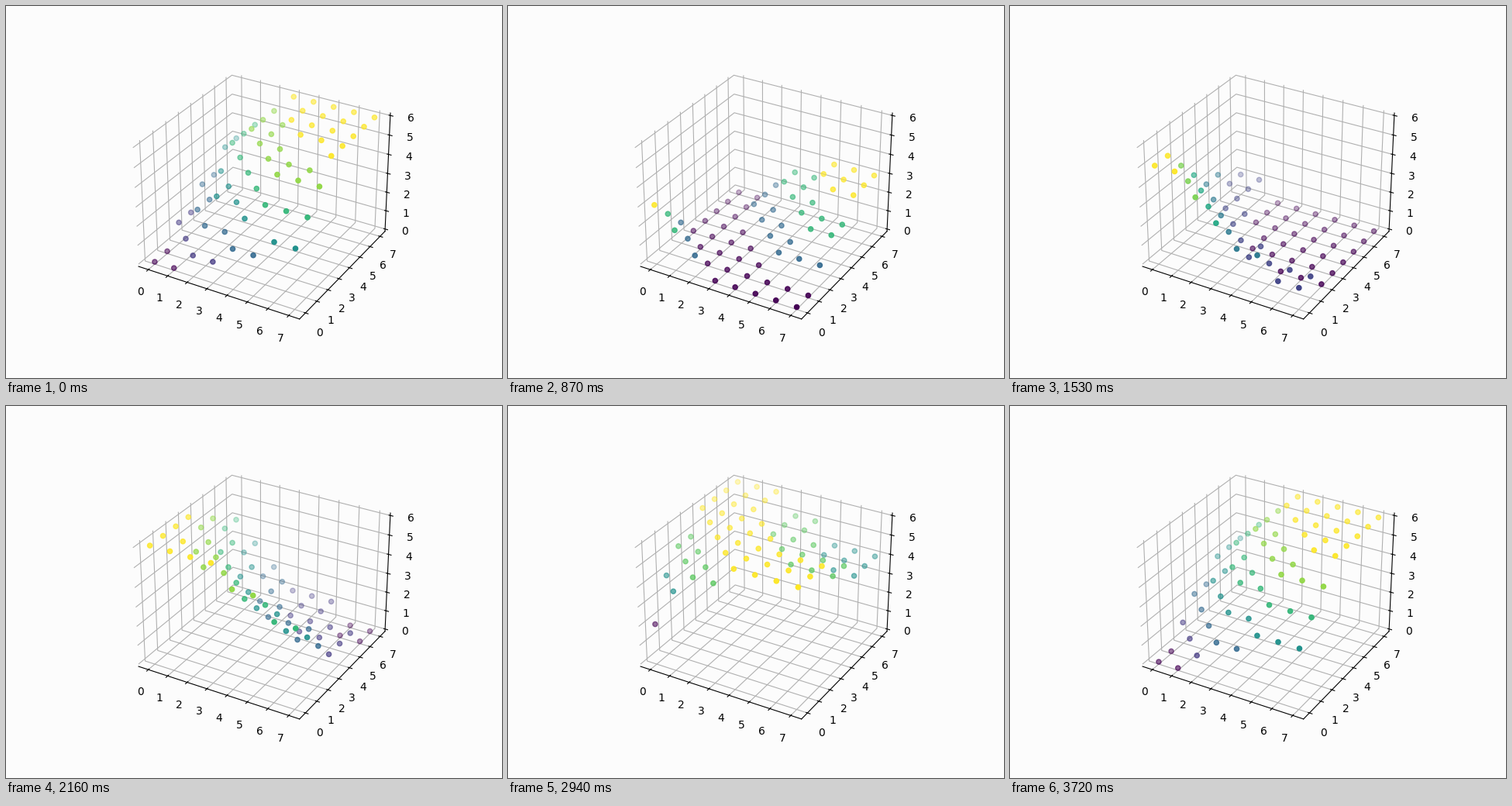
A matplotlib script for the animation above (3750 ms loop, 640 px wide and 480 px high).

```python
import numpy as np
import matplotlib.pyplot as plt
from matplotlib.animation import FuncAnimation

SIZE = 8          # points per side
FRAMES = 125
INTERVAL = 30     # ms
SPEED = 0.05      # phase per frame
AMP = 3           # half the wave's height
CENTRE = 7.5      # the rings shrink towards this corner
BACK = "#fcfcfc"


def padded(low, high, margin=0.0):
    """Limits with a data margin plus the usual small 3D view margin."""
    pad = (high - low) * margin
    low, high = low - pad, high + pad
    view = (high - low) / 48
    return low - view, high + view


fig = plt.figure(figsize=(6.4, 4.8), dpi=100, facecolor=BACK)
ax = fig.add_subplot(projection="3d", facecolor=BACK)
ax.set_xlim(*padded(0, SIZE - 1, 0.05))
ax.set_ylim(*padded(0, SIZE - 1, 0.05))
ax.set_zlim(*padded(0, 2 * AMP))
ax.set_xticks(range(SIZE))
ax.set_yticks(range(SIZE))
ax.set_zticks(range(2 * AMP + 1))
for axis in (ax.xaxis, ax.yaxis, ax.zaxis):
    axis.set_pane_color(BACK)

x, y = (g.ravel() for g in np.meshgrid(range(SIZE), range(SIZE)))
phase = np.pi * ((x - CENTRE) ** 2 + (y - CENTRE) ** 2) / (2 * CENTRE ** 2)
dots = None


def update(i):
    """Redraw the dots; colours span the heights present in this frame."""
    global dots
    if dots is not None:
        dots.remove()
    z = np.rint(AMP + AMP * np.cos(phase + SPEED * i))
    dots = ax.scatter(x, y, z, c=z, cmap="viridis")
    return [dots]


anim = FuncAnimation(fig, update, frames=FRAMES, interval=INTERVAL,
                     repeat=True, repeat_delay=0, blit=False)
plt.show()
```
